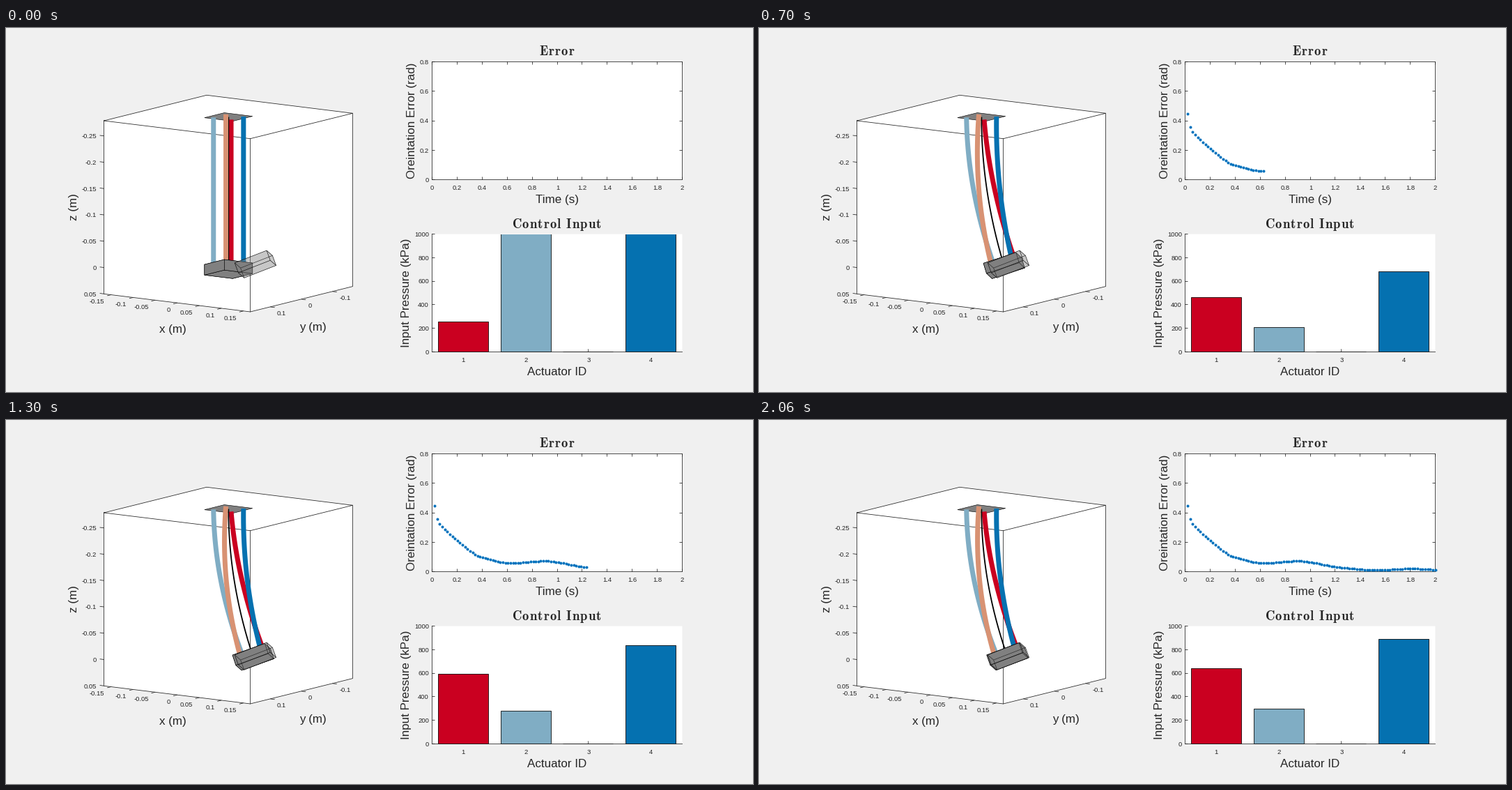
Animation, 1072 px wide and 522 px high, one loop 2.08 s. Source, as a matplotlib script:

```python
import numpy as np
import matplotlib.pyplot as plt
from matplotlib.animation import FuncAnimation
from matplotlib.patches import Polygon, Rectangle

W, H, DPI = 1072, 522, 100
PX = 72 / DPI                      # points per pixel
INK = "#262626"
RED, SKY, TAN, BLUE = "#ca0020", "#80adc4", "#d89273", "#0571b0"

plt.rcParams["font.family"] = "Liberation Sans"
plt.rcParams["path.snap"] = False
fig = plt.figure(figsize=(W / DPI, H / DPI), dpi=DPI, facecolor="#f0f0f0")
ax = fig.add_axes([0, 0, 1, 1])
ax.set_xlim(0, W)
ax.set_ylim(H, 0)
ax.axis("off")


def crisp(v):
    """Centre of the pixel that holds v."""
    return np.floor(v) + 0.5


def line(xs, ys, color=INK, width=0.8, z=2, **kw):
    return ax.plot(xs, ys, color=color, lw=width * PX, zorder=z, **kw)[0]


def text(x, y, s, size=9.5, ha="center", rot=0, **kw):
    ax.text(x, y, s, fontsize=size * PX, ha=ha, va="baseline", rotation=rot,
            rotation_mode="anchor", color=INK, zorder=9, **kw)


def label(x, y, s, rot=0):
    text(x, y, s, 17, rot=rot)


def title(y, s):
    spaced = r"\hspace{0.07}".join(c.replace(" ", r"\ ") for c in s)
    text(791, y, rf"$\mathbf{{{spaced}}}$", 18.7, math_fontfamily="cm")


def shape(pts, face, edge="none", z=1, width=0.6):
    return ax.add_patch(Polygon(pts, closed=True, fc=face, ec=edge,
                                lw=width * PX, zorder=z))


def smooth(t, xs, ys):
    """Monotone cubic through a few key points."""
    xs, ys = np.asarray(xs, float), np.asarray(ys, float)
    h = np.diff(xs)
    d = np.diff(ys) / h
    same = d[:-1] * d[1:] > 0
    total = np.where(same, d[:-1] + d[1:], 1)
    inner = np.where(same, 2 * d[:-1] * d[1:] / total, 0)
    m = np.concatenate([[d[0]], inner, [d[-1]]])
    i = np.clip(np.searchsorted(xs, t, side="right") - 1, 0, len(h) - 1)
    u = (t - xs[i]) / h[i]
    return (ys[i] * (1 + 2 * u) * (1 - u) ** 2 + ys[i + 1] * u * u * (3 - 2 * u)
            + h[i] * u * (1 - u) * (m[i] * (1 - u) - m[i + 1] * u))


# ---- time histories ------------------------------------------------------
STEPS = 99
step = np.arange(STEPS + 1)
time = step * 2 / STEPS
kick = 0.2 ** step                 # fast transient of the first steps

error = 0.46 * kick + smooth(
    time, [0, 0.2, 0.384, 0.64, 0.9, 1.23, 1.52, 1.82, 2],
    [0.37, 0.212, 0.102, 0.058, 0.072, 0.03, 0.011, 0.02, 0.013])
bend = np.clip(1 - error / 0.36, 0, 0.037 * step)
twist = 1 - 0.3 ** step

low = smooth(time, [0, 0.14, 0.384, 0.55, 0.89, 1.23, 1.43, 2],
             [240, 228, 222, 201, 248, 278, 269, 293])
mid = low + 365 - 258 * np.exp(-time / 0.75)
high = mid + 246 - 133 * np.exp(-time / 0.36)
pressure = [mid - 90 * kick, low + 900 * kick, 0 * time, high + 700 * kick]

# ---- 3D view -------------------------------------------------------------
PROJ = np.array([[632, -445, 0], [78, 111, 755]])
NEAR = np.array([-0.567, -0.805, 0.177])
BASE = np.array([319.3, 127.6])
HALF, ARM = 0.032, 0.02


def frame_at(s, b, tw):
    """Projected body axes and their depth at arc position s."""
    a, t = -0.73 * tw * s, 0.35 * b * s
    ca, sa, ct, st = np.cos(a), np.sin(a), np.cos(t), np.sin(t)
    spin = np.array([[ca, -sa, 0], [sa, ca, 0], [0, 0, 1]])
    axes = np.array([[ct, st], [-st, ct]]) @ PROJ @ spin
    axes[1, 1] += 18 * b * s
    return axes, NEAR @ spin


def centre(s, b):
    return BASE + [36 * b * s ** 2, (210.5 - 6.5 * b * b) * s]


def box_faces(b, tw):
    """Faces of the end block, far ones first."""
    axes, depth = frame_at(1, b, tw)
    tip = centre(1, b)
    faces = []
    for n in range(3):
        p, q = [i for i in range(3) if i != n]
        for sign in (-1, 1):
            pts = []
            for u, v in ((-1, -1), (1, -1), (1, 1), (-1, 1)):
                c = np.zeros(3)
                c[n], c[p], c[q] = sign, u, v
                pts.append(tip + axes @ (c * [HALF, HALF, 0.01] + [0, 0, 0.01]))
            faces.append((sign * depth[n], pts))
    faces.sort(key=lambda f: f[0])
    return [np.array(pts) for _, pts in faces]


# room corners: left, back, right and front, on the ceiling and on the floor
DROP = np.array([0, 248.3])
left, back, right, front = np.array(
    [(140.5, 133), (288, 96.3), (497.5, 122.3), (350.5, 158.7)])
shape([left, back, right, right + DROP, front + DROP, left + DROP], "white")
for path in ([left, back, right, front, left],
             [left, left + DROP, front + DROP, right + DROP, right],
             [front, front + DROP]):
    line(*np.transpose(path))

for v in np.arange(-5, 2) * 0.05:
    y = 343.5 + 755 * v
    line([135, 140.5], [y - 0.7, y])
    text(130, y + 3.4, f"{v:.2g}", ha="right")
for v in np.arange(-3, 4) * 0.05:
    x, y = 245.5 + 632 * v, 394.2 + 78 * v
    line([x, x - 5], [y, y + 1.3])
    text(x - 9.2, y + 12.8, f"{v:.2g}", ha="right")
for v in (0.1, 0, -0.1):
    x, y = 424.3 - 445 * v, 388.9 + 111 * v
    line([x, x + 5.5], [y, y + 0.7])
    text(x + 9.3, y + 12.1, f"{v:g}", ha="left")
label(239, 437, "x (m)")
label(440.5, 434, "y (m)")
label(102, 257, "z (m)", 90)

square = np.array([(-1, 1), (-1, -1), (1, -1), (1, 1)]) * HALF
shape(BASE + square @ PROJ[:, :2].T, "#808080", "black", z=3)

# tubes from far to near; the thin core sits between them
TUBES = [(1, 1, RED, 7), (-1, 1, SKY, 7), (0, 0, "black", 1.8),
         (1, -1, BLUE, 7), (-1, -1, TAN, 7)]
tubes = [line([], [], c, w, z=4 + 0.1 * i, solid_capstyle="butt")
         for i, (_, _, c, w) in enumerate(TUBES)]
block = [shape(np.zeros((4, 2)), "#808080", "black", z=5 + 0.1 * i) for i in range(6)]
for pts in box_faces(1, 1):
    shape(pts, (0.5, 0.5, 0.5, 0.25), (0, 0, 0, 0.7), z=6, width=0.5)

# ---- right-hand plots ----------------------------------------------------
X0, X1 = 611.5, 970.5
E0, E1 = 217.5, 48.5
B0, B1 = 464.5, 295.5
TICK = 3.6


def panel(y0, y1):
    return ax.add_patch(Rectangle((X0, y1), X1 - X0, y0 - y1, fc="white", ec="none", zorder=1))


def y_ticks(y0, y1, names):
    for i, name in enumerate(names):
        y = y0 + i * (y1 - y0) / (len(names) - 1)
        line([X0, X0 + TICK], [crisp(y)] * 2)
        text(607, y + 3.4, name, ha="right")


panel(E0, E1)
line([X0, X1, X1, X0, X0], [E0, E0, E1, E1, E0])
for i in range(11):
    x = crisp(X0 + i * (X1 - X0) / 10)
    line([x, x], [E0, E0 - TICK])
    line([x, x], [E1, E1 + TICK])
    text(x, 231.6, f"{i / 5:g}")
y_ticks(E0, E1, [f"{i / 5:g}" for i in range(5)])
for i in range(1, 4):
    line([X1, X1 - TICK], [crisp(E0 + i * (E1 - E0) / 4)] * 2)
label(791, 251.5, "Time (s)")
label(587.5, 132.5, "Oreintation Error (rad)", 90)
title(38.7, "Error")

area = panel(B0, B1)
line([X0, X0, X1], [B1, B0, B0], z=4)
UNIT = (X1 - X0) / 4
bars = []
for i, color in enumerate((RED, SKY, TAN, BLUE)):
    x = X0 + (i + 0.5) * UNIT
    x0, x1 = crisp(x - 0.4 * UNIT), crisp(x + 0.4 * UNIT)
    line([crisp(x)] * 2, [B0, B0 - TICK])
    text(x, 478.7, str(i + 1))
    bar = Rectangle((x0, B0), x1 - x0, 0, fc=color, ec="black", lw=0.8 * PX, zorder=3)
    ax.add_patch(bar)
    bar.set_clip_path(area)
    bars.append(bar)
y_ticks(B0, B1, [str(200 * i) for i in range(6)])
label(791, 498.5, "Actuator ID")
label(579.5, 380, "Input Pressure (kPa)", 90)
title(286.7, "Control Input")

dots, = ax.plot([], [], "o", ms=4 * PX, mfc="#0072bd", mec="none", zorder=6)
dot_x = X0 + time * (X1 - X0) / 2
dot_y = E0 + error * (E1 - E0) / 0.8

HOLD = 5                            # frames spent on the first pose
ARC = np.linspace(0, 1, 30)


def draw(i):
    k = max(0, i - HOLD + 1)
    b, tw = bend[k], twist[k]
    spine = [(centre(s, b), frame_at(s, b, tw)[0]) for s in ARC]
    for tube, (u, v, _, _) in zip(tubes, TUBES):
        pts = np.array([c + axes @ [u * ARM, v * ARM, 0] for c, axes in spine])
        tube.set_data(pts[:, 0], pts[:, 1])
    for face, pts in zip(block, box_faces(b, tw)):
        face.set_xy(pts)
    for bar, p in zip(bars, pressure):
        bar.set_height(crisp(B0 - p[k] * (B0 - B1) / 1000) - B0)
    dots.set_data(dot_x[1:k + 1], dot_y[1:k + 1])
    return [*tubes, *block, *bars, dots]


anim = FuncAnimation(fig, draw, frames=STEPS + HOLD, interval=20,
                     repeat=True, repeat_delay=0, blit=False)
plt.show()
```
